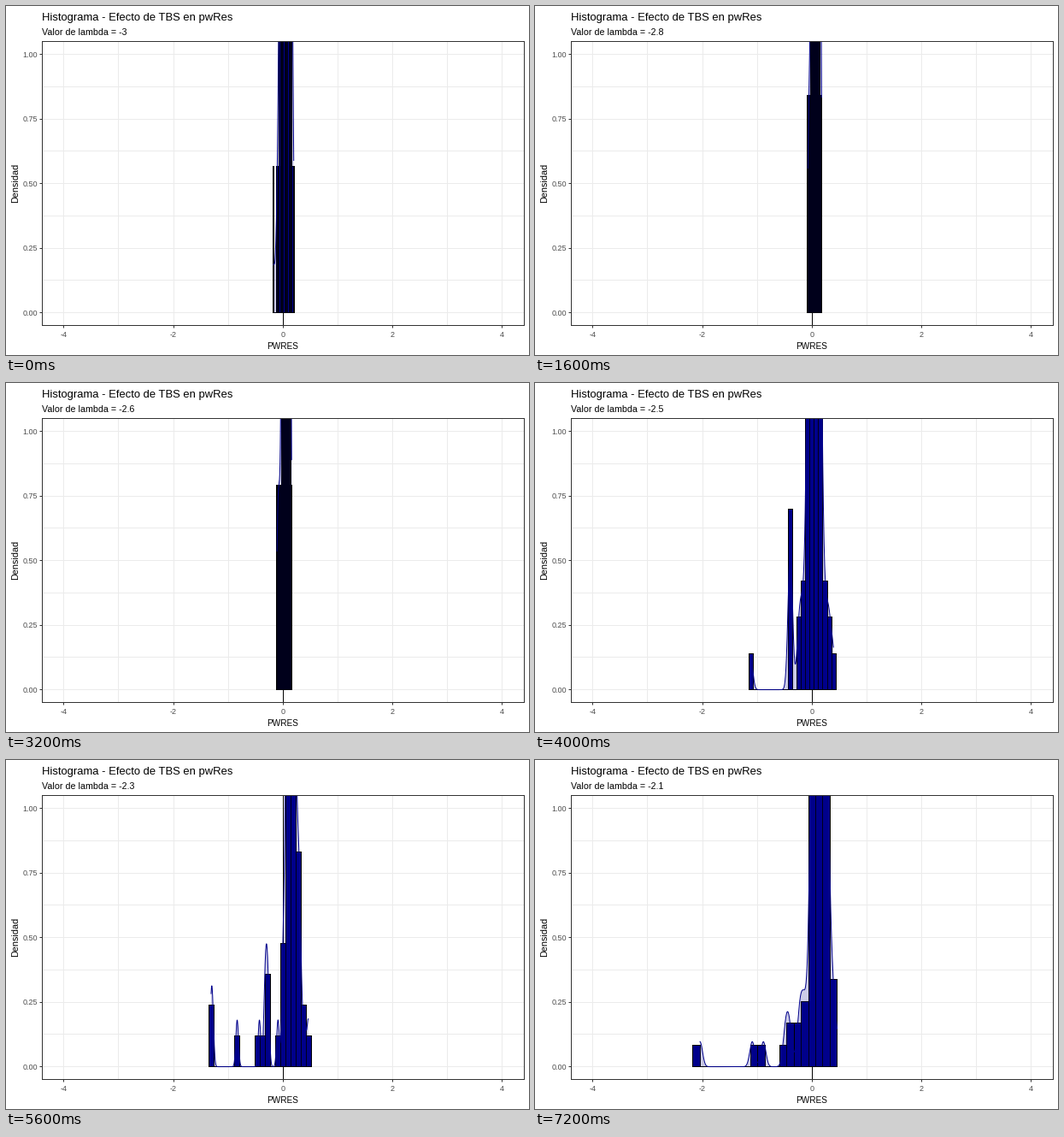
A matplotlib script that plays this animation: 612 px wide and 408 px high, repeating every 8000 ms.

```python
import numpy as np
import matplotlib.pyplot as plt
from matplotlib.animation import ArtistAnimation
from matplotlib.transforms import Affine2D

W, H = 612, 408
N, BINS = 90, 20
NAVY = "#00008B"
plt.rcParams["font.family"] = "Liberation Sans"

fig = plt.figure(figsize=(W / 72, H / 72), dpi=72, facecolor="white")
ax = fig.add_axes([41.75 / W, 34.85 / H, 564 / W, 332 / H])
ax.set(xlim=(-4.4, 4.4), ylim=(-0.05, 1.05), autoscale_on=False)
pixel_mid = ax.transData + Affine2D().translate(0.5, -0.5)


def label(x, y, s, size, color="black", **kw):
    """Text with its baseline at pixel (x, y) counted from the top left."""
    kw = {"va": "baseline", **kw}
    return fig.text(x / W, 1 - y / H, s, fontsize=size, color=color, **kw)


def run(a, b, n):
    return np.linspace(a, b, n)


def sample(first, lo, hi, *tails):
    """N values in bin units: both ends, tail points and a hump from lo to hi."""
    tails = np.hstack([first, first + BINS - 1, *tails])
    n = N - len(tails)
    u = (np.arange(n) + 0.5) / n
    hump = 0.5 - np.sin(np.arcsin(1 - 2 * u) / 3)
    return np.sort(np.append(lo + (hi - lo) * hump, tails))


def narrow(first, lo, n):
    """Hump over nearly the whole range, with n single values left of it."""
    return sample(first, lo, first + BINS - 1.5, lo - 0.5 - np.arange(n))


def wide(first, lo, *tails):
    """Narrow hump around zero with long tails."""
    return sample(first, lo, 2.5, *tails)


def bandwidth(pts):
    """Silverman's rule of thumb."""
    q1, q3 = np.quantile(pts, [0.25, 0.75])
    return 0.9 * min(pts.std(ddof=1), (q3 - q1) / 1.34) * N ** -0.2


def draw_scene(lam, width, pts):
    """Histogram, density and subtitle; pts are in bin units."""
    bins = np.floor(pts + 0.5).astype(int)
    ks = np.arange(bins[0], bins[-1] + 1)
    counts = np.array([(bins == k).sum() for k in ks])
    bars = ax.bar(ks * width, counts / (N * width), width, color=NAVY,
                  edgecolor="black", linewidth=1, antialiased=False, zorder=1)

    bw = bandwidth(pts)
    x = np.linspace(pts[0], pts[-1], 512)
    z = (x[:, None] - pts) / bw
    dens = np.exp(-z * z / 2).sum(axis=1) / (N * bw * width * np.sqrt(2 * np.pi))
    area = ax.fill_between(x * width, 0, dens, color=NAVY, alpha=0.2, linewidth=0,
                           transform=pixel_mid, zorder=1.5)
    curve, = ax.plot(x * width, dens, color=NAVY, linewidth=1,
                     transform=pixel_mid, zorder=2)
    text = label(42, 34, f"Valor de lambda = {lam:.2g}", 10.65)
    return [*bars, area, curve, text]


# Panel, grid and axes
for i in range(-4, 5):
    ax.axvline(i, color="#EBEBEB", linewidth=1, antialiased=False, zorder=0.5)
for i in range(9):
    ax.axhline(i / 8, color="#EBEBEB", linewidth=1, antialiased=False, zorder=0.5)
ax.axvline(0, color="black", linewidth=1, antialiased=False, zorder=0.8)
for spine in ax.spines.values():
    spine.set(color="#333333", linewidth=1)
xs, ys = np.arange(-4, 5, 2), np.arange(5) / 4
ax.set_xticks(xs, [""] * len(xs))
ax.set_yticks(ys, [""] * len(ys))
ax.tick_params(length=3, width=1, color="#333333")
for v in xs:
    label(323.7 + v * 64.09, 387, str(v), 9, "#4D4D4D", ha="center")
for v in ys:
    label(37.3, 361.6 - v * 301.8, f"{v:.2f}", 9, "#4D4D4D", ha="right")

label(42, 17, "Histograma - Efecto de TBS en pwRes", 12.95)
label(324, 401, "PWRES", 10, ha="center")
label(16, 207, "Densidad", 10.9, rotation=90, ha="right", va="center")

# Bin width and sample for each lambda
scenes = [
    (0.0196, narrow(-9.1, -4.5, 2)),
    (0.0207, narrow(-7, -3.5, 2)),
    (0.0132, narrow(-5.9, -2.5, 3)),
    (0.0148, narrow(-4.9, -2.5, 2)),
    (0.014, narrow(-7.9, -2.5, 5)),
    (0.0793, wide(-14.09, -1.5, run(-5.3, -4.75, 5), run(-3.2, -1.7, 5),
                  run(2.6, 4.2, 5))),
    (0.078, wide(-15, -1.5, run(-5.1, -1.6, 8), run(2.6, 3.6, 3))),
    (0.0934, wide(-14.08, 0.5, -13.8, -8.98, -4.63, run(-3.6, -2.9, 4), -1,
                  run(-0.1, 0.45, 4), run(2.55, 3.3, 7), run(3.6, 4.2, 2))),
    (0.0741, wide(-11.76, -1.5, run(-7.7, -2.8, 10), run(-2.4, -1.6, 6),
                  run(2.6, 4.4, 6), run(4.6, 5.4, 5))),
    (0.1318, wide(-15.53, -0.5, -8.29, -6.75, run(-3.75, -3.05, 3),
                  run(-1.9, -0.8, 5), run(2.6, 2.95, 3))),
]
frames = [draw_scene(-3 + k / 10, *scene) for k, scene in enumerate(scenes)]

anim = ArtistAnimation(fig, frames, interval=800, repeat=True, repeat_delay=0)
plt.show()
```
